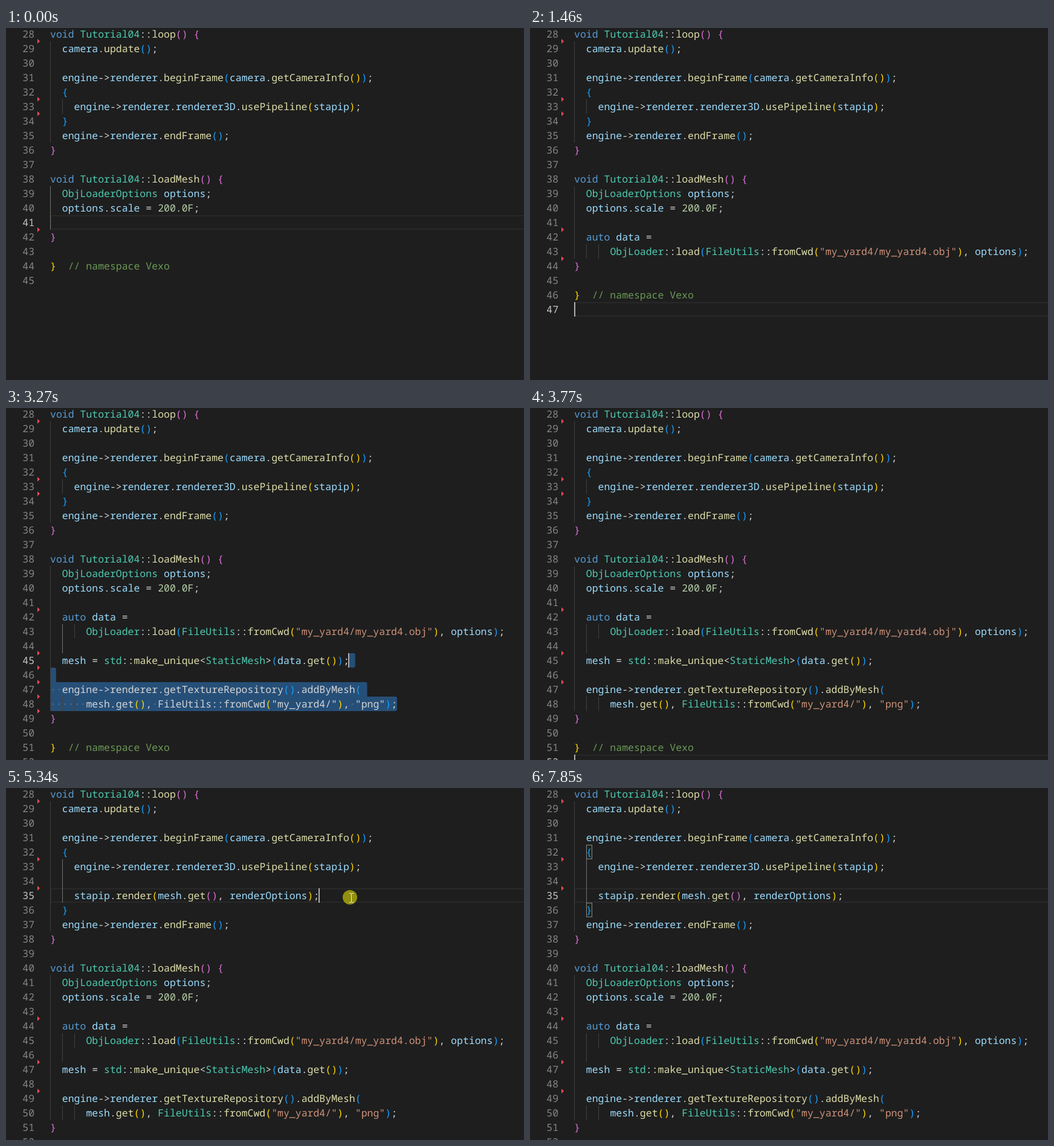
These frames come from a looping animation (857x583 px, 8.33 s). An HTML page with a canvas:

```html
<!DOCTYPE html>
<html lang="en">
<head>
<meta charset="utf-8">
<title>Code editor</title>
<style>
html, body { margin: 0; width: 100%; height: 100%; overflow: hidden; background: #1e1e1e; }
canvas { display: block; }
</style>
</head>
<body>
<canvas id="stage" width="857" height="583"></canvas>
<script>
const ctx = document.getElementById('stage').getContext('2d');
const LOOP = 8330, FIRST = 28, LEFT = 73, ADV = 9.897, ROW = 24;
const PLAIN = '#d4d4d4', BRACKETS = ['#ffd700', '#da70d6', '#179fff'];

const base = `void Tutorial04::loop() {
  camera.update();

  engine->renderer.beginFrame(camera.getCameraInfo());
  {
    engine->renderer.renderer3D.usePipeline(stapip);
  }
  engine->renderer.endFrame();
}

void Tutorial04::loadMesh() {
  ObjLoaderOptions options;
  options.scale = 200.0F;

}

}  // namespace Vexo
`.split('\n');

// Each insert: line number to insert before, then the new lines.
const inserts = [
  [42, '  auto data =', '      ObjLoader::load(FileUtils::fromCwd("my_yard4/my_yard4.obj"), options);'],
  [44, '', '  mesh = std::make_unique<StaticMesh>(data.get());'],
  [46, '', '  engine->renderer.getTextureRepository().addByMesh(',
    '      mesh.get(), FileUtils::fromCwd("my_yard4/"), "png");'],
  [34, '', '    stapip.render(mesh.get(), renderOptions);']
];

const docs = [base];
for (const [at, ...added] of inserts) {
  const lines = docs[docs.length - 1].slice();
  lines.splice(at - FIRST, 0, ...added);
  docs.push(lines);
}
const pages = docs.map(lines => ({ lines, tokens: tokenize(lines), levels: indentLevels(lines) }));

// sel: last selected line; guide: [column, first line, last line]; raw: ms before colouring
const steps = [
  { t: 0, page: 0, line: 41, col: 0, guide: [0, 39, 41] },
  { t: 250, page: 0, line: 45, col: 0 },
  { t: 920, page: 1, line: 41, col: 0, sel: 43, guide: [0, 39, 43] },
  { t: 1150, page: 1, line: 47, col: 0 },
  { t: 2070, page: 2, line: 43, col: 76, sel: 45, guide: [4, 43, 43] },
  { t: 2530, page: 2, line: 49, col: 0 },
  { t: 3270, page: 3, line: 45, col: 50, sel: 48, guide: [2, 43, 44], raw: 70 },
  { t: 3770, page: 3, line: 52, col: 0 },
  { t: 4500, page: 4, line: 33, col: 52, sel: 35, guide: [2, 33, 35], raw: 30 },
  { t: 5270, page: 4, line: 35, col: 45, guide: [2, 33, 35] }
];
const blinks = [0, 780, 1700, 3070, 4250, 5800, 6330, 6860, 7330, 7850];

// Lines with a red change marker below them
const marks = [
  { t: 0, at: [28, 32, 33, 41] },
  { t: 920, at: [28, 32, 33, 41, 42, 43] },
  { t: 1190, at: [28, 32, 33, 41, 43] },
  { t: 2070, at: [28, 32, 33, 41, 43, 44, 45] },
  { t: 2260, at: [28, 32, 33, 41, 44, 45] },
  { t: 3270, at: [28, 32, 33, 41, 44, 45, 46, 47, 48] },
  { t: 3540, at: [28, 32, 33, 41, 44, 46] },
  { t: 4500, at: [28, 32, 33, 34, 35, 43, 46, 48] },
  { t: 4670, at: [28, 32, 34, 43, 46, 48] }
];

function tokenize(lines) {
  let depth = 1;
  return lines.map(text => {
    const out = [];
    for (const m of text.matchAll(/\/\/.*|"[^"]*"|\d[\w.]*|[A-Za-z_]\w*|[(){}]|[^\s\w(){}"]+/g)) {
      const s = m[0], next = text[m.index + s.length];
      const bracket = /^[(){}]$/.test(s);
      let color = PLAIN;
      if (bracket) {
        if (s === ')' || s === '}') depth--;
        color = BRACKETS[depth % 3];
        if (s === '(' || s === '{') depth++;
      }
      else if (s.startsWith('//')) color = '#6a9955';
      else if (s[0] === '"') color = '#ce9178';
      else if (/^\d/.test(s)) color = '#b5cea8';
      else if (/^(void|auto)$/.test(s)) color = '#569cd6';
      else if (/^([A-Z]|std$)/.test(s)) color = '#4ec9b0';
      else if (/^\w/.test(s)) color = next === '(' || next === '<' ? '#dcdcaa' : '#9cdcfe';
      out.push({ s, col: m.index, color, bracket });
    }
    return out;
  });
}

function indentLevels(lines) {
  const indent = i => lines[i] ? lines[i].search(/\S/) : -1;
  return lines.map((text, i) => {
    if (text) return indent(i) / 2;
    let a = i, b = i;
    while (a >= 0 && !lines[a]) a--;
    while (b < lines.length && !lines[b]) b++;
    const above = indent(a), below = indent(b);
    if (below < 0) return 0;
    return above === below ? above / 2 : 1 + Math.min(above, below) / 2;
  });
}

const current = (list, t) => list.filter(e => e.t <= t).pop();
const rowY = line => (line - FIRST) * ROW - 2;
const colX = col => LEFT + col * ADV;

function rect(color, x, y, w, h) {
  ctx.fillStyle = color;
  ctx.fillRect(x, y, w, h);
}

function drawSelection(step, lines) {
  const spans = [];
  for (let n = step.line; n <= step.sel; n++) {
    const len = lines[n - FIRST].length + (n < step.sel ? 1 : 0);
    spans.push({ n, l: colX(n === step.line ? step.col : 0), r: colX(len) });
  }
  const round = (s, edge) => s && s.l <= edge && edge <= s.r ? 0 : 3;
  ctx.fillStyle = '#264f78';
  spans.forEach(({ n, l, r }, i) => {
    const up = spans[i - 1], down = spans[i + 1];
    ctx.beginPath();
    ctx.roundRect(l, rowY(n), r - l, ROW, [round(up, l), round(up, r), round(down, r), round(down, l)]);
    ctx.fill();
  });
  // Visible spaces
  ctx.fillStyle = 'rgba(227,228,226,.22)';
  for (const { n } of spans.slice(1)) {
    [...lines[n - FIRST]].forEach((c, col) => {
      if (c !== ' ') return;
      ctx.beginPath();
      ctx.arc(colX(col + 0.5), rowY(n) + 12.5, 1.2, 0, 7);
      ctx.fill();
    });
  }
}

function drawGuides(levels, active) {
  levels.forEach((level, i) => {
    const n = i + FIRST;
    for (let col = 0; col < level * 2; col += 2) {
      const lit = active && col === active[0] && n >= active[1] && n <= active[2];
      rect(lit ? '#707070' : '#404040', Math.round(colX(col)), rowY(n), 1, ROW);
    }
  });
}

function drawText(step, page, t) {
  ctx.font = '16.495px "Noto Sans Mono", monospace';
  ctx.textRendering = 'geometricPrecision';
  const raw = step.raw && t < step.t + step.raw;
  page.tokens.forEach((tokens, i) => {
    const n = i + FIRST, y = rowY(n) + 18;
    ctx.fillStyle = n === step.line ? '#c6c6c6' : '#858585';
    ctx.fillText(n, 27.3, y);
    const plain = raw && n > step.line && n <= step.sel;
    for (const { s, col, color, bracket } of tokens) {
      ctx.fillStyle = plain && !bracket ? PLAIN : color;
      ctx.fillText(s, colX(col), y);
    }
  });
}

function drawMarks(list) {
  ctx.fillStyle = '#f14c4c';
  for (const n of list) {
    const y = rowY(n + 1);
    ctx.beginPath();
    ctx.moveTo(52, y - 4);
    ctx.lineTo(56, y);
    ctx.lineTo(52, y + 4);
    ctx.fill();
  }
}

function drawBracketBox(line, col) {
  const x = Math.round(colX(col));
  rect('rgba(0,100,0,.1)', x, rowY(line), 10, ROW);
  ctx.strokeStyle = '#888';
  ctx.lineWidth = 1;
  ctx.strokeRect(x + 0.5, rowY(line) + 0.5, 9, ROW - 1);
}

function drawPointer(t) {
  if (t < 4940 || t >= 6130) return;
  const tick = 4940 + Math.floor((t - 4940) / 66) * 66;
  const go = Math.max(0, 1 - (tick - 4940) / 330) ** 2;
  const p = Math.max(0, (tick - 5600) / 530), leave = p * p * (3 - 2 * p);
  const x = 569 + 150 * go + 300 * leave, y = 181 + 95 * go + 388 * leave;
  ctx.fillStyle = 'rgba(255,250,0,.52)';
  ctx.beginPath();
  ctx.arc(x, y, 12, 0, 7);
  ctx.fill();
  const cx = Math.round(x) + 2, cy = Math.round(y);
  rect('#f0f0e0', cx, cy - 6, 1, 14);
  for (const dy of [-7, 8]) {
    rect('#f0f0e0', cx - 3, cy + dy, 3, 1);
    rect('#f0f0e0', cx + 1, cy + dy, 3, 1);
  }
}

function draw(t) {
  const step = current(steps, t), page = pages[step.page];
  rect('#1e1e1e', 0, 0, 857, 583);
  if (step.sel) drawSelection(step, page.lines);
  else {
    ctx.strokeStyle = '#282828';
    ctx.lineWidth = 2;
    ctx.strokeRect(LEFT + 1, rowY(step.line) + 1, 800, ROW - 2);
  }
  drawGuides(page.levels, step.guide);
  if (t >= 5410) {
    drawBracketBox(32, 2);
    drawBracketBox(36, 2);
  }
  drawText(step, page, t);
  drawMarks(current(marks, t).at);
  const flips = blinks.filter(b => b >= step.t && b <= t).length;
  if (flips % 2 === 0) {
    const x = step.col ? Math.floor(colX(step.col) - 1) : LEFT;
    rect('#aeafad', x, rowY(step.line), 2, ROW);
  }
  drawPointer(t);
}

const begin = performance.now();
function animate() {
  draw((performance.now() - begin) % LOOP);
  requestAnimationFrame(animate);
}
animate();
</script>
</body>
</html>
```
